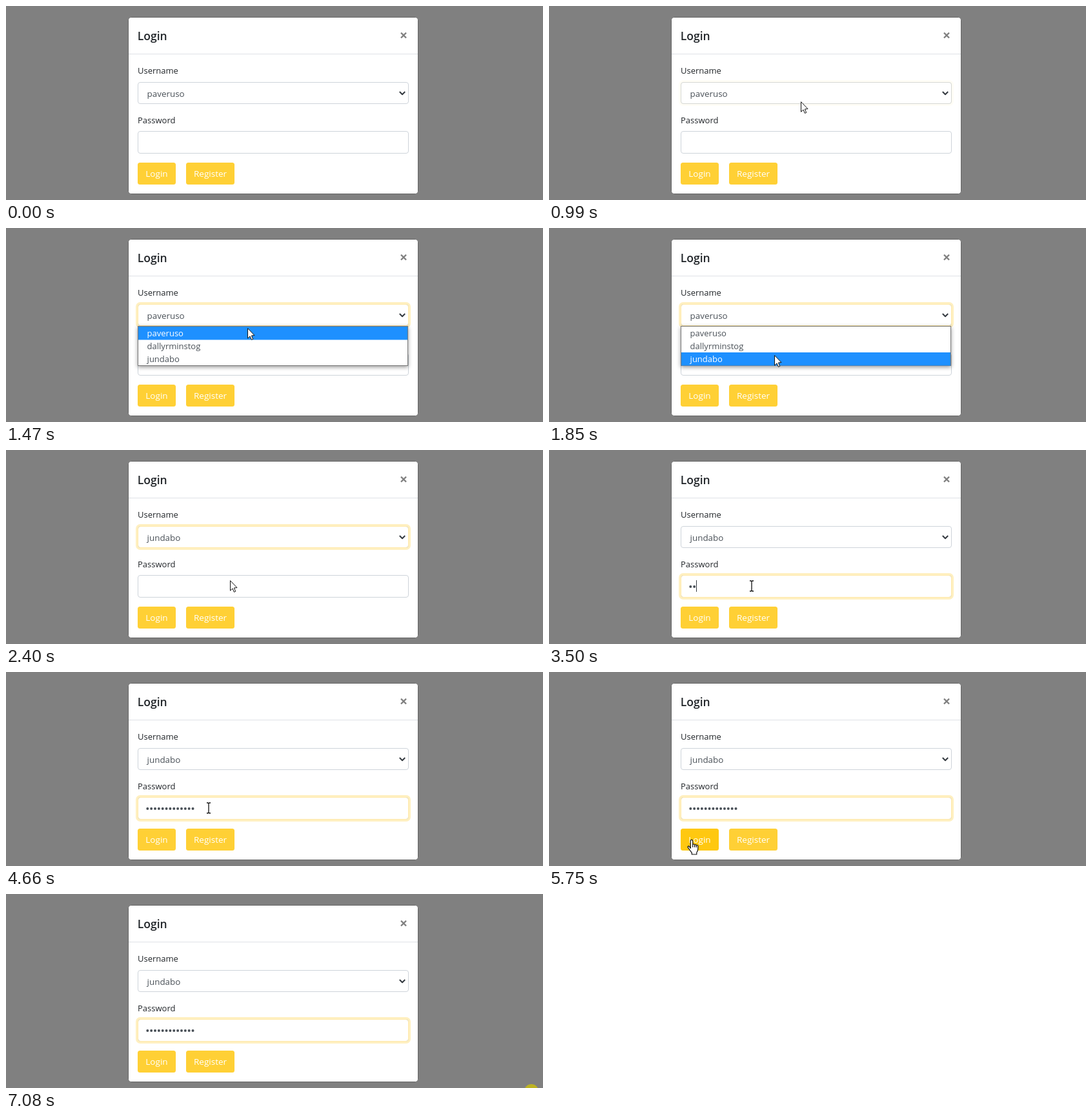
These frames come from a looping animation (832 by 301 pixels, 7160 ms). An HTML page:

```html
<!DOCTYPE html>
<html lang="en">
<head>
<meta charset="utf-8">
<title>Login dialog</title>
<style>
  html, body { margin: 0; width: 100%; height: 100%; overflow: hidden; background: #808080; }
  svg { display: block; width: 832px; height: 301px; }
  text { font: 13px "Open Sans", "Noto Sans", sans-serif; fill: #212529; }
  .title { font-size: 17.5px; font-weight: 600; }
  .value { font-size: 13.4px; fill: #495057; }
  .option { fill: #495057; }
  .button { font-size: 13.5px; fill: #fff; text-anchor: middle; }
  .line { fill: none; stroke-linejoin: round; }
  .popup { filter: drop-shadow(0 2px 3px rgba(0, 0, 0, .4)); }
</style>
</head>
<body>
<svg id="stage" viewBox="0 0 832 301">
  <rect x="189.5" y="17.5" width="449" height="274" rx="4" fill="#fff" stroke="#666"/>
  <text class="title" x="203.8" y="53">Login</text>
  <path class="line" d="M612 41.5l8 8m0-8l-8 8" stroke="#7f7f7f" stroke-width="2.4"/>
  <path d="M190 74.5H638" stroke="#dee2e6"/>

  <text x="204" y="105">Username</text>
  <g id="select"></g>
  <text id="value" class="value" x="218.6" y="141"></text>
  <path class="line" d="M609.8 133l4.2 4.2 4.2-4.2" stroke="#343a40" stroke-width="2"/>

  <text x="204" y="182">Password</text>
  <g id="password"></g>
  <g id="dots" fill="#495057"></g>
  <path id="caret" d="M.5 202V220" stroke="#343a40"/>

  <rect id="login" x="204" y="243" width="59" height="34" rx="3.5"/>
  <rect x="279" y="243" width="75" height="34" rx="3.5" fill="#ffd035"/>
  <text class="button" x="233.5" y="265">Login</text>
  <text class="button" x="316.5" y="265">Register</text>

  <g id="popup">
    <rect class="popup" x="204.5" y="152.5" width="418" height="61" fill="#fff" stroke="#767676"/>
    <rect id="highlight" x="205" width="417" height="20.5" fill="#1e90ff"/>
    <g id="options"></g>
  </g>

  <circle id="spot" cx="814" cy="306" r="11" fill="#bdb323"/>

  <g id="cursor">
    <path id="arrow" fill="#fff" stroke="#111" d="M.5 .7V16.2L4 12.9L6.4 18.4L8.7 17.4L6.4 12L11 11.6Z"/>
    <path id="beam" class="line" stroke="#111" stroke-width="1.3" d="M-3-8h2l1 1 1-1h2M0-7V7M-3 8h2l1-1 1 1h2"/>
    <g id="hand" class="line" stroke="#111" stroke-width="1.2" transform="translate(-6.7 -.5)">
      <path fill="#fff" d="M5 14V2.5a1.7 1.7 0 0 1 3.4 0V8.6a1.5 1.5 0 0 1 2.9 0V9.3a1.4 1.4 0 0 1 2.7 0v.9a1.3 1.3 0 0 1 2.5 0V15q0 3-2 5.5V23.5H7V21Q4.5 18 3 15.5L.9 12.6Q.3 10.8 2 10.6Q3.4 11 5 14Z"/>
      <path d="M8.4 8.6v3.8M11.3 9.3v3.2M14 10.2v2.5"/>
    </g>
  </g>
</svg>
<script>
const LOOP = 7160;
const DOT_STEP = 5.85;
const names = ["paveruso", "dallyrminstog", "jundabo"];
const $ = id => document.getElementById(id);

// Each entry holds from its time until the next: [time, x, y, shape]
const pointer = [
  [0], [140, 613, 219, "beam"], [220, 429, 158, "arrow"],
  [450, 421, 155, "arrow"], [530, 407, 151, "arrow"], [600, 396, 149, "arrow"], [680, 390, 148, "arrow"],
  [1470, 374, 155, "arrow"], [1550, 369, 163, "arrow"], [1630, 363, 174, "arrow"], [1700, 357, 184, "arrow"],
  [1780, 352, 193, "arrow"], [1850, 349, 197, "arrow"], [1930, 341, 201, "arrow"], [2010, 337, 195, "arrow"],
  [2250, 348, 195, "arrow"], [2400, 347, 202, "arrow"], [2480, 342, 211, "beam"], [2560, 331, 211, "beam"],
  [2640, 320, 211, "beam"], [2720, 314, 211, "beam"],
  [5130, 310, 213, "beam"], [5210, 298, 222, "beam"], [5290, 275, 239, "arrow"], [5370, 257, 252, "hand"],
  [5440, 240, 258, "hand"], [5520, 227, 260, "hand"], [5600, 221, 260, "hand"],
  [6300, 390, 280, "arrow"], [6380, 627, 288, "arrow"], [6460]
];
const typed = [
  [0, 0], [3500, 2], [3570, 3], [3640, 4], [3790, 6], [3870, 8], [3950, 10], [4030, 11], [4110, 13]
];
const blink = [
  [0, 0], [2950, 1], [4660, 0], [5210, 1], [5750, 0], [6300, 1], [6760, 0]
];

const at = (track, t) => track.findLast(entry => entry[0] <= t);
const ramp = (t, start) => Math.min(1, Math.max(0, (t - start) / 150));
const show = (id, on) => $(id).style.display = on ? "" : "none";

function field(id, y, height) {
  const box = style => `<rect x="204.5" y="${y}" width="419" height="${height}" rx="3.5" ${style}/>`;
  $(id).innerHTML =
    box('class="focus" fill="none" stroke="#fff0c1" stroke-width="7"') +
    box('fill="#fff" stroke="#ced4da"') +
    box('class="focus" fill="none" stroke="#ffe9a9"');
}

function setFocus(id, amount) {
  for (const rect of $(id).querySelectorAll(".focus")) rect.style.opacity = amount;
}

field("select", 118.5, 33);
field("password", 194.5, 34);
$("options").innerHTML = names.map((name, i) =>
  `<text class="option" x="218.6" y="${168 + 20 * i}">${name}</text>`).join("");
$("dots").innerHTML = Array.from({ length: 13 }, (_, i) =>
  `<circle cx="${219.3 + DOT_STEP * i}" cy="212" r="2"/>`).join("");

function render(t) {
  const [, x, y, shape] = at(pointer, t);
  show("cursor", shape);
  for (const id of ["arrow", "beam", "hand"]) show(id, id === shape);
  if (shape) $("cursor").setAttribute("transform", `translate(${x} ${y})`);

  const passwordFocus = ramp(t, 2930);
  setFocus("select", ramp(t, 970) - passwordFocus);
  setFocus("password", passwordFocus);
  $("value").textContent = names[t < 2400 ? 0 : 2];

  show("popup", t >= 1070 && t < 2400);
  const row = Math.min(2, Math.max(0, Math.floor((y - 153) / 20))) || 0;
  $("highlight").setAttribute("y", 153 + 20 * row);
  [...$("options").children].forEach((option, i) => option.style.fill = i === row ? "#fff" : "");

  const count = at(typed, t)[1];
  [...$("dots").children].forEach((dot, i) => dot.style.display = i < count ? "" : "none");
  show("caret", at(blink, t)[1]);
  $("caret").setAttribute("transform", `translate(${Math.round(216 + DOT_STEP * count)} 0)`);

  const hover = ramp(t, 5350) - ramp(t, 6270);
  $("login").style.fill = `rgb(255, ${208 - 8 * hover}, ${53 - 37 * hover})`;
  show("spot", t >= 7080);
}

const start = performance.now();
function tick() {
  render((performance.now() - start) % LOOP);
  requestAnimationFrame(tick);
}
tick();
</script>
</body>
</html>
```
